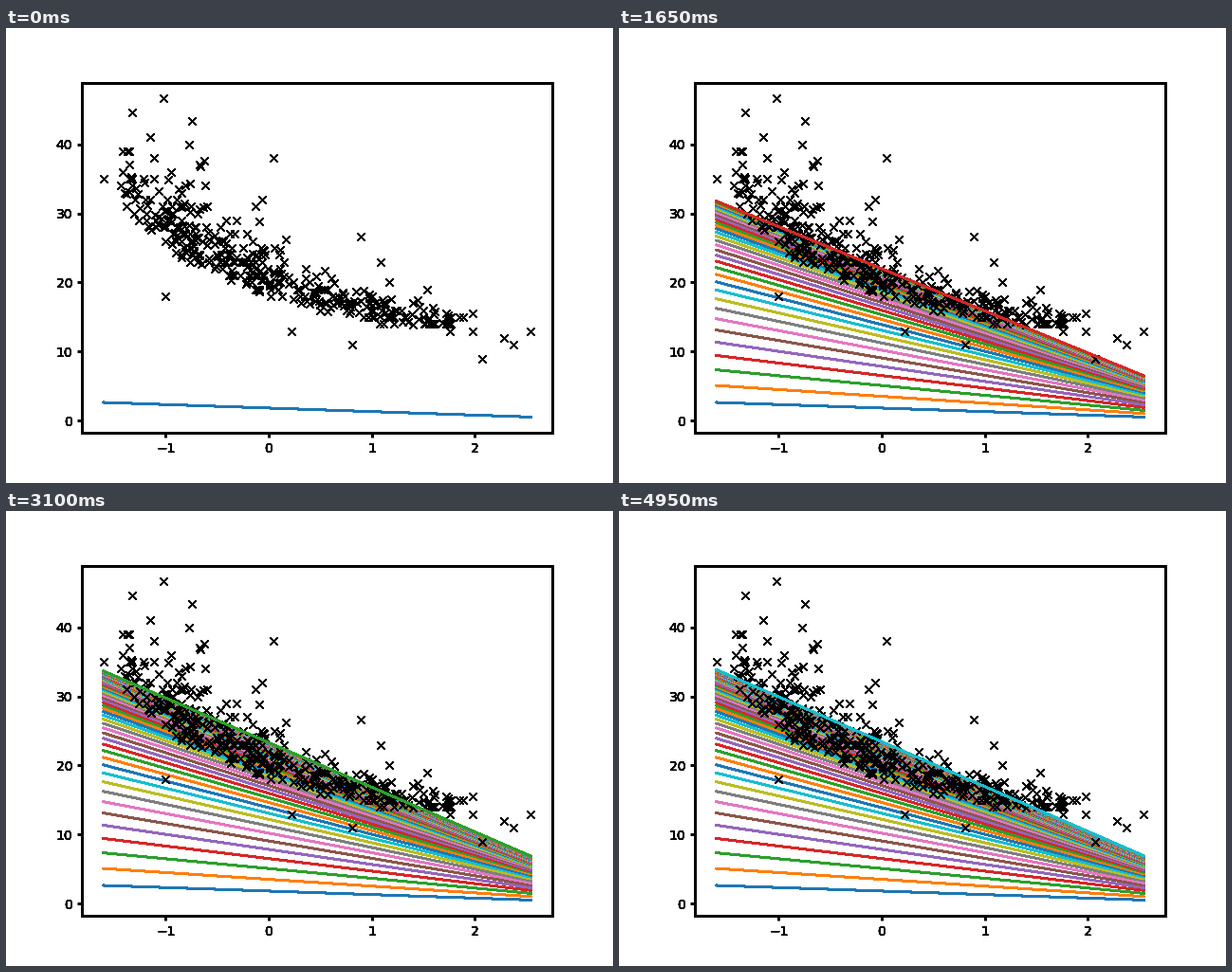
Animation of 640 by 480 pixels, one loop 5050 ms. Source, as a matplotlib script:

```python
import numpy as np
import matplotlib.pyplot as plt
from matplotlib.animation import FuncAnimation

plt.rcParams["path.simplify"] = False

STEPS = 100
RATE = 0.0785
MEAN, SLOPE = 23.446, -6.487
X_MIN, X_MAX = -1.6065, 2.5458
Y_MAX = 46.6
PX = 0.72       # one pixel in points at 100 dpi
PASSES = 10     # repeated passes harden the soft edges

# The few points that stand clear of the crowd.
APART = [(X_MIN, 35), (-1.33, 44.6), (-1.02, Y_MAX), (-0.75, 43.4),
         (0.05, 38), (0.89, 26.6), (1.09, 23), (X_MAX, 13),
         (2.28, 12), (2.38, 11), (2.07, 9), (0.81, 11),
         (0.22, 13), (-1.0, 18)]


def crowd(n):
    """Points in a band that falls and narrows, thinning out upwards."""
    rng = np.random.default_rng(11)
    x = -1.45 + 3.55 * rng.beta(1.25, 1.75, n)
    low = 11 + 6.5 * np.exp(-0.75 * x)
    span = 8 * np.exp(-0.4 * x)
    y = low + span * rng.gamma(3, 0.15, n)
    y = np.minimum(y, 41 - 5 * np.abs(x + 1.05))
    whole = rng.random(n) < 0.55
    return x, np.where(whole, np.round(y), y)


def fit_line(x, step):
    learned = 1 - (1 - RATE) ** (step + 1)
    return learned * (MEAN + SLOPE * x)


def padded(low, high):
    pad = 0.05 * (high - low)
    return low - pad, high + pad


fig = plt.figure(figsize=(6.4, 4.8), dpi=100, facecolor="white")
ax = fig.add_axes([0.125, 0.11, 0.775, 0.77])
ax.set_xlim(padded(X_MIN, X_MAX))
ax.set_ylim(padded(fit_line(X_MAX, 0), Y_MAX))
ax.set_xticks(range(-1, 3))
ax.set_yticks(range(0, 50, 10))
ax.tick_params(width=3 * PX, length=3.7, labelleft=False, labelbottom=False)
for spine in ax.spines.values():
    spine.set_linewidth(3 * PX)


def label(value, xy, coords, offset, **align):
    text = str(value).replace("-", "\u2212")
    for _ in range(PASSES):
        ax.annotate(text, xy, xycoords=coords, xytext=offset,
                    textcoords="offset points", fontsize=10,
                    family="DejaVu Sans", annotation_clip=False, **align)


for v in range(-1, 3):
    label(v, (v, 0), ("data", "axes fraction"), (0, -7),
          ha="center", va="top")
for v in range(0, 50, 10):
    label(v, (0, v), ("axes fraction", "data"), (-7, 0),
          ha="right", va="center_baseline")

xs, ys = np.hstack([crowd(380), np.transpose(APART)])
ax.plot(np.tile(xs, PASSES), np.tile(ys, PASSES), "kx",
        markersize=6, markeredgewidth=1, zorder=3)

# Each fit runs to and fro so that its edges fill in.
sweep = np.tile([X_MIN, X_MAX], 20)
fits = [ax.plot(sweep, fit_line(sweep, k), color=f"C{k % 10}", lw=1.5)[0]
        for k in range(STEPS)]


def update(i):
    newest = min(i, STEPS - 1)
    for k, fit in enumerate(fits):
        fit.set_visible(k <= newest)
        fit.set_zorder(4 if k == newest else 2)
    return fits


anim = FuncAnimation(fig, update, frames=STEPS + 1, interval=50,
                     init_func=lambda: update(0), repeat=True, repeat_delay=0)
plt.show()
```
